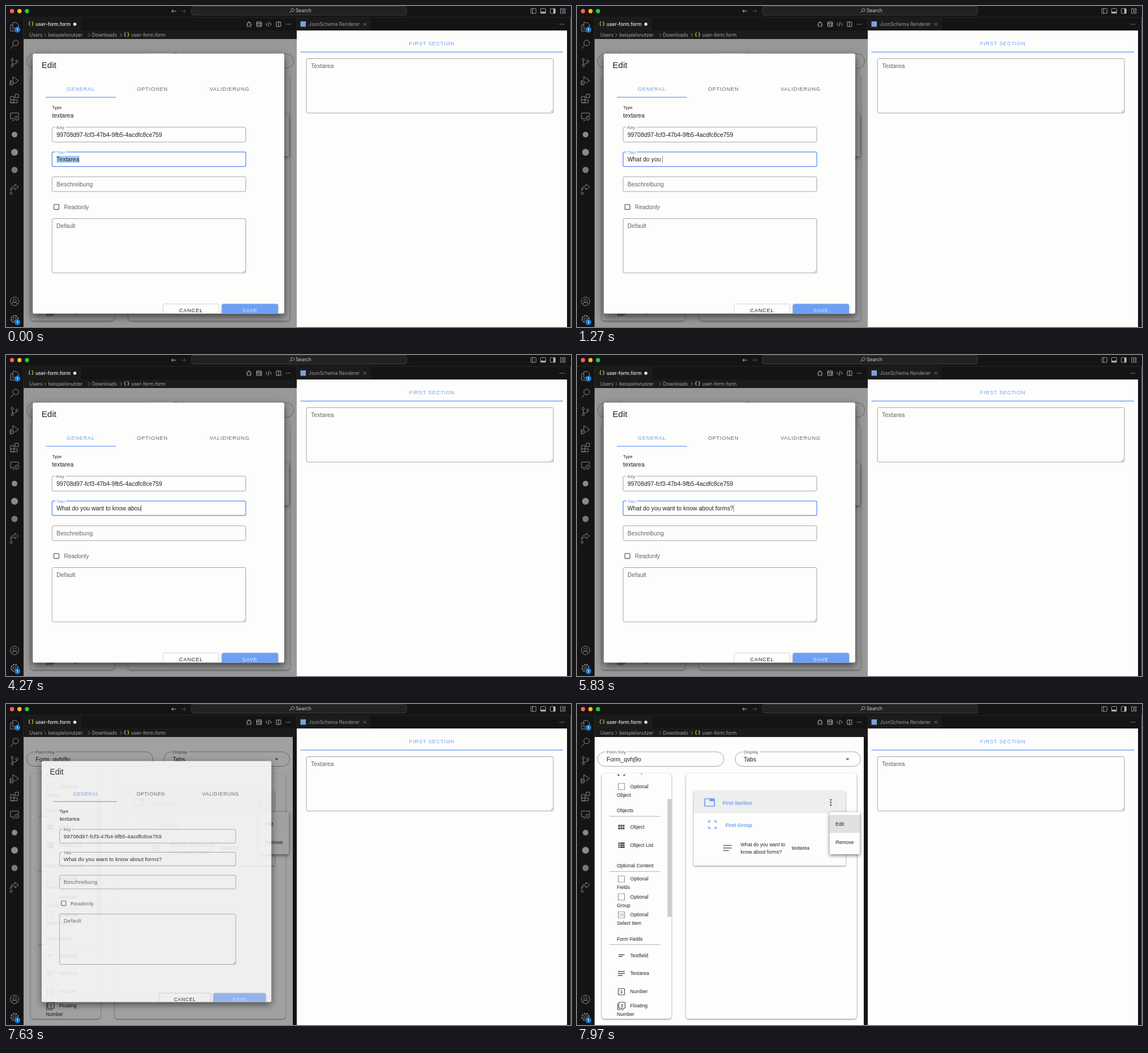
An HTML page for the animation above (8 s loop, 993x564 px).

```html
<!DOCTYPE html>
<html lang="en">
<head>
<meta charset="utf-8">
<title>Form editor</title>
<style>
  html, body { margin: 0; width: 100%; height: 100%; overflow: hidden; background: #141414; }
  svg { display: block; width: 993px; height: 564px; }
  text { font-family: "Liberation Sans", Arial, sans-serif; white-space: pre; }
  .ui { font-family: Inter, sans-serif; }
  .caps { letter-spacing: .82px; text-anchor: middle; }
  .bold { font-weight: bold; }
  .medium { font-weight: 500; }
  .mid { text-anchor: middle; }
  .paper { filter: drop-shadow(0 1px 1.5px #0007); }
  .menu { filter: drop-shadow(0 2px 3px #0008); }
  .dialog { filter: drop-shadow(0 5px 7px #0009); }
</style>
</head>
<body>
<svg id="stage" viewBox="0 0 993 564"></svg>
<script>
const LOOP = 8000;
const BLUE = '#6d9ff6', INK = '#222', MUTED = '#666', LINE = '#8f8f8f', PAPER = '#fdfdfc';
const BODY = 10.45, SMALL = 7.84, ITEM = 8.6, CAPS = 9.14;
const TITLE = 'What do you want to know about forms?';

// Typed characters over time: [ms, count]
const TYPING = [[100, 0], [1250, 12], [1400, 12], [2700, 20], [2930, 21], [4530, 31],
                [4930, 32], [5230, 34], [5370, 35], [5600, 36], [5830, 37]];
const BLUR_AT = 7500, CLOSE_AT = 7580, CLOSE_MS = 163, FADE_MS = 300, BACKDROP = .4;

// Text is placed by its left (or middle) x and the vertical centre of its capitals.
const text = (x, y, s, size = ITEM, fill = INK, cls = '') =>
  `<text x="${x}" y="${y + size * .355}" font-size="${size}" fill="${fill}" class="${cls}">${s}</text>`;
const ui = (x, y, s, fill = '#ccc', cls = '') => text(x, y, s, 8.4, fill, 'ui ' + cls);
const rect = (x, y, x2, y2, fill, rx = 0, more = '') =>
  `<rect x="${x}" y="${y}" width="${x2 - x}" height="${y2 - y}" fill="${fill}" rx="${rx}" ${more}/>`;
const box = (x, y, x2, y2, stroke = LINE, rx = 2.5, width = .8) =>
  rect(x, y, x2, y2, 'none', rx, `stroke="${stroke}" stroke-width="${width}"`);
const path = (d, stroke = '#8a8a8a', width = 1, more = '') =>
  `<path d="${d}" fill="none" stroke="${stroke}" stroke-width="${width}" ${more}/>`;
const dot = (x, y, r, fill) => `<circle cx="${x}" cy="${y}" r="${r}" fill="${fill}"/>`;
const at = (x, y, s) => `<g transform="translate(${x} ${y})">${s}</g>`;
const grip = (x, y) => path(`M${x - 5} ${y - 1}l4-4M${x - 2.5} ${y - 1}l1.5-1.5`, '#777', .7);
const label = (x, y, s, width, fill = MUTED) =>
  rect(x - 2, y - 3, x + width + 2, y + 3, PAPER) + text(x, y, s, SMALL, fill);
const dots = (x, y, fill) => [-3.2, 0, 3.2].map(d => dot(x + d, y, .8, fill)).join('');

function activityBar() {
  const badge = y => dot(20, y, 5.2, '#1177d1') + text(20, y, '1', 6.5, '#fff', 'ui mid bold');
  return [
    at(15, 36, path('M-3-7h6l4 4v7h-10zM-3-3h-4v11h9v-4')), badge(41.5),
    at(15, 67, path('M-7 8L-2 2') + '<circle cx="2" cy="-2" r="5" fill="none" stroke="#8a8a8a"/>'),
    at(15, 99, path('M-4-3V4M4 0q0 3-8 3M-4-7a2 2 0 1 0 .1 0M4-4a2 2 0 1 0 .1 0M-4 4a2 2 0 1 0 .1 0')),
    at(15, 131, path('M-3-1V-7L7 0L0 5M-5 0a3 3 0 0 1 3 3v2a3 3 0 0 1-6 0v-2a3 3 0 0 1 3-3M-8 4h6M-8 0l2 2M-8 8l2-2')),
    at(15, 163, path('M-7-4h6v11h-6zM-7 2h12v5h-12M1-8h6v6h-6z')),
    at(15, 194, path('M-1 4h-6v-10h14v5M-4 7h4') + '<circle cx="4" cy="3" r="3.5" fill="none" stroke="#8a8a8a"/>' + path('M3 2l2 1-2 1', '#8a8a8a', .7)),
    dot(15, 226, 5, '#8a8a8a'), dot(15, 257, 6, '#8a8a8a'), dot(15, 288, 5.5, '#777'),
    at(15, 320, path('M1-7l6 5-6 5v-3q-6-1-8 5q0-9 8-9zM-6 7a2 2 0 1 0 .1 0')),
    at(15, 519, path('M0-7.5a7.5 7.5 0 1 0 .1 0M0-4a3 3 0 1 0 .1 0M-5 5q1-4 5-4t5 4')),
    at(15, 550, path('M0-6a6 6 0 1 0 .1 0', '#8a8a8a', 2.2, 'stroke-dasharray="3 1.7"') + path('M0-2.5a2.5 2.5 0 1 0 .1 0')),
    badge(555.5)
  ].join('');
}

function titleBar() {
  const lights = ['#ff5f57', '#febc2e', '#28c840'].map((c, i) => dot(10.5 + i * 13.2, 9, 3.7, c)).join('');
  const pane = (x, bar) => box(x - 4.5, 4.5, x + 4.5, 13, '#bbb', 1) + rect(...bar, '#bbb');
  return lights +
    path('M299 9h-8m3-3l-3 3 3 3', '#bbb') + path('M308 9h8m-3-3l3 3-3 3', '#555') +
    rect(326, .5, 704, 16, '#222', 4, 'stroke="#444" stroke-width=".8"') +
    path('M498 12l3-3M503.5 4.5a2.7 2.7 0 1 0 .1 0', '#bbb', .9) + ui(509, 8.5, 'Search') +
    pane(927, [925, 5, 925.8, 13]) + pane(944, [940, 10, 948, 12.5]) + pane(961, [962, 5, 965, 13]) +
    box(974.5, 4.5, 978, 13, '#bbb', .5) + box(980, 4.5, 983, 8, '#bbb', .5) + box(980, 10, 983, 13, '#bbb', .5);
}

function tabs() {
  const chevron = x => path(`M${x - 1.5} 48l3 3-3 3`, '#999', .8);
  const braces = (x, y) => text(x, y, '{ }', 8.4, '#d5c33e', 'ui bold');
  return path('M30.5 20V564M0 20H993M511 20V43M131 20V43M640 20V43', '#2b2b2b', .8) +
    rect(31, 20.5, 131, 58, '#1b1b1b') + rect(131, 43, 511, 58, '#1b1b1b') + rect(511.5, 20.5, 640, 43, '#1b1b1b') +
    braces(39, 31.5) + ui(52, 32, 'user-form.form', '#f2f2f2', 'medium') + dot(121, 32, 2.7, '#eee') +
    ui(41, 51, 'Users', '#a5a5a5') + chevron(69) + ui(74.5, 51, 'beispielsnutzer', '#a5a5a5') + chevron(146) +
    ui(151, 51, 'Downloads', '#a5a5a5') + chevron(202) + braces(207, 50.5) + ui(220, 51, 'user-form.form', '#a5a5a5') +
    at(427, 32, path('M0-3a3 3.5 0 1 0 .1 0M-4-3l2 2M4-3l-2 2M-5 1h2M5 1h-2M-4 5l2-2M4 5l-2-2M-2-3q2-3 4 0', '#bbb', .9)) +
    box(440.5, 28, 449, 36, '#bbb', .5, 1) + path('M441 30.5h8M442 33h3M447 32v3', '#bbb', 1.2) +
    path('M459 29.5l-2.5 2.5 2.5 2.5M464 29.5l2.5 2.5-2.5 2.5M462.5 28l-2 8', '#bbb', .9) +
    box(475, 28, 483, 36, '#bbb', .5, .9) + path('M479 28v8', '#bbb', .9) + dots(496, 32, '#bbb') +
    rect(517.5, 27, 527, 36.5, '#7ba3d8') + ui(532, 32, 'JsonSchema Renderer', '#9a9a9a') +
    path('M628 29.5l5 5m0-5l-5 5', '#999', .8) + dots(977, 32, '#bbb');
}

const renderer = () => rect(511, 43, 986, 564, PAPER) + rect(992, 20, 993, 564, '#666') +
  text(748.5, 66, 'FIRST SECTION', CAPS, BLUE, 'caps') + rect(517.5, 80.2, 979, 81.6, BLUE) +
  box(528, 92.5, 962, 188) + text(536, 105, 'Textarea', BODY, MUTED) + grip(962, 188);

const corners = (x, y, color, r = 6.5) => path(
  `M${x - r} ${y - 3}v${3 - r}h${r - 3}M${x + 3} ${y - r}h${r - 3}v${r - 3}M${x + r} ${y + 3}v${r - 3}h${3 - r}M${x - 3} ${y + r}h${3 - r}v${3 - r}`, color, 1.6);
const icons = {
  dashed: y => path(`M72.5 ${y - 5}h11v11h-11z`, '#444', 1.2, 'stroke-dasharray="1.4 1.35"'),
  select: y => icons.dashed(y) + path(`M75 ${y - 1}h7M75 ${y + 2}h7`, '#444', 1.2, 'stroke-dasharray="1.4 1.35"'),
  grid: y => path(`M72.5 ${y - 2}h11M72.5 ${y + 2.5}h11`, '#555', 3.6, 'stroke-dasharray="3.2 .7"'),
  list: y => [-2.8, .7, 4.2].map(d => path(`M72.5 ${y + d}h2.4m.8 0h8`, '#555', 2.7)).join(''),
  short: y => path(`M73 ${y - 1}h10.5M73 ${y + 2}h7`, '#555', 1.3),
  lines: y => path(`M72 ${y - 3}h12M72 ${y + .5}h12M72 ${y + 4}h8`, '#555', 1.3),
  one: y => box(72.5, y - 5, 83.5, y + 6, '#444', 1, 1.1) + text(78, y + .5, '1', 7.5, '#333', 'mid bold'),
  stack: y => box(73.5, y - 6, 84.5, y + 4.5, '#444', 1, 1.1) + path(`M71.5 ${y - 4}v11h11`, '#444', 1.1) + text(79, y - .7, '1', 7.5, '#333', 'mid bold')
};

function palette(wide) {
  const heading = (y, s) => text(70, y, s) + rect(57, y + 9.8, 146, y + 10.7, '#aaa');
  const item = (y, icon, s, rest) => icons[icon](y) + text(93.5, y, s) + (rest ? text(70, y + 15, rest) : '');
  const last = wide ? item(537, 'stack', 'Floating Number') : item(530, 'stack', 'Floating', 'Number');
  return rect(43.5, 122, wide ? 190 : 166, 553, PAPER, 5, 'class="paper"') +
    `<g clip-path="url(#palette)">` +
    corners(78, 120, '#555', 5.5) + text(93.5, 119, 'Group') + item(144.5, 'dashed', 'Optional', 'Object') +
    heading(187, 'Objects') + item(216, 'grid', 'Object') + item(247.5, 'list', 'Object List') +
    heading(284, 'Optional Content') + item(307, 'dashed', 'Optional', 'Fields') +
    item(338.5, 'dashed', 'Optional', 'Group') + item(370, 'select', 'Optional', 'Select Item') +
    heading(412.5, 'Form Fields') + item(441.5, 'short', 'Textfield') + item(473, 'lines', 'Textarea') +
    item(505, 'one', 'Number') + last + '</g>' +
    (wide ? '' : rect(159, 167, 166, 374, '#cdcdcd'));
}

function page(wide) {
  const right = wide ? 511 : 504, shift = wide ? 3 : 0;
  return rect(31, 58, right, 564, PAPER) +
    box(36.5, 84, 258 + shift, 109.5, LINE, 12.7) + label(52, 84, 'Form Key', 34) + text(52, 97, 'Form_qvhj9o', BODY) +
    box(278 + shift, 84, right - 5.5, 109.5, LINE, 12.7) + label(293 + shift, 84, 'Display', 27) +
    text(293 + shift, 97, 'Tabs', BODY) + '<path d="M472 95.5h7l-3.5 3.5z" fill="#666"/>' +
    palette(wide) +
    rect(wide ? 215 : 191.5, 122, wide ? 498.5 : 491.5, 553, PAPER, 5, 'class="paper"') +
    rect(205, 153, 472, 284, PAPER, 2, 'class="paper"') + rect(205, 153, 472, 192, '#eee', 2) +
    box(224.5, 166.5, 241.5, 179.5, BLUE, 1, 1.7) + rect(233, 166, 242, 171, BLUE) +
    text(256, 173.5, 'First Section', ITEM, BLUE, 'bold') +
    [168.5, 173, 177.5].map(y => dot(446, y, 1.4, '#555')).join('') +
    corners(238, 212, BLUE) + text(261, 213, 'First Group', ITEM, BLUE, 'bold') +
    path('M257 248.5h15M257 253h15M257 257.5h10', '#666', 1.5) +
    text(287.5, 246.5, 'What do you want to') + text(287.5, 259.5, 'know about forms?') + text(377.5, 253, 'textarea') +
    rect(444, 190, 497, 264, PAPER, 2, 'class="menu"') +
    (wide ? '' : rect(444, 195, 497, 226.5, '#e0e0e0', 0, 'id="highlight"')) +
    text(454.5, 211, 'Edit') + text(454.5, 242.5, 'Remove');
}

// The inset narrows the layout on both sides; text keeps its size.
function dialog(inset) {
  const left = 81 + inset, right = 421.5 - inset, inner = 88.7 + inset;
  const caps = (x, y, s, fill) => text(x, y, s, CAPS, fill, 'caps');
  return rect(47 + inset, 83.5, 489 - inset, 540.5, PAPER, 3, 'class="dialog"') +
    text(62.5 + inset, 104, 'Edit', 15.1) +
    caps(131.5 + inset, 145.5, 'GENERAL', BLUE) + caps(257.3, 145.5, 'OPTIONEN', MUTED) +
    caps(393 - inset, 145.5, 'VALIDIERUNG', MUTED) + rect(70 + inset, 159.7, 193, 161, BLUE) +
    text(left, 178.5, 'Type', SMALL) + text(left, 192.5, 'textarea', BODY) +
    box(left, 213, right, 239) + label(inner, 213.5, 'Key', 14) +
    text(inner, 226, '99708d97-fcf3-47b4-9fb5-4acdfc8ce759', BODY) +
    `<g id="idle">${box(left, 256.5, right, 282)}${label(inner, 257, 'Titel', 15)}</g>` +
    `<g id="focus">${box(left, 256.5, right, 282, BLUE, 2.5, 1.5)}${label(inner, 257, 'Titel', 15, BLUE)}</g>` +
    rect(inner, 263, inner + 40.3, 275.5, '#aecdfa', 0, 'id="selection"') +
    `<g id="value">${text(inner, 269.5, '', BODY)}</g>` +
    rect(0, 263.5, .8, 275.5, '#777', 0, 'id="caret"') +
    box(left, 300, right, 326) + text(inner, 313, 'Beschreibung', BODY, MUTED) +
    box(left + 3.2, 348.7, left + 12, 357.5, '#666', 1, 1.3) + text(left + 20.7, 353.5, 'Readonly', BODY, MUTED) +
    box(left, 373.5, right, 469) + text(inner, 386.5, 'Default', BODY, MUTED) + grip(right, 469) +
    '<g clip-path="url(#dialog)">' +
    box(276 - inset, 523.5, 374 - inset, 548, '#c8c8c8', 2.5) + caps(325.3 - inset, 535, 'CANCEL', INK) +
    rect(379.5 - inset, 523.5, 478 - inset, 548, BLUE, 2.5, 'class="paper"') +
    rect(379.5 - inset, 523.5, 478 - inset, 548, '#fff', 2.5, 'id="press" opacity=".25"') +
    caps(428.8 - inset, 535, 'SAVE', '#e3edff') + '</g>';
}

document.getElementById('stage').innerHTML = `
  <defs>
    <clipPath id="palette">${rect(43, 122, 190, 553, '#000')}</clipPath>
    <clipPath id="dialog">${rect(47, 83, 489, 540.5, '#000')}</clipPath>
  </defs>
  ${rect(0, 0, 993, 564, '#141414')}${titleBar()}${tabs()}${activityBar()}
  <g id="wide">${page(true)}</g><g id="narrow">${page(false)}</g>
  <rect id="backdrop" x="31" y="58" height="506"/>
  <g id="modal"></g>${renderer()}`;

const el = id => document.getElementById(id);
const set = (id, name, value) => el(id).setAttribute(name, value);
const show = (id, on) => set(id, 'display', on ? 'inline' : 'none');
const clamp = x => Math.max(0, Math.min(1, x));

// cubic-bezier(x1, 0, x2, 1)
function ease(x, x1, x2) {
  let lo = 0, hi = 1;
  for (let i = 0; i < 24; i++) {
    const t = (lo + hi) / 2, u = 1 - t;
    if (3 * u * u * t * x1 + 3 * u * t * t * x2 + t * t * t < x) lo = t; else hi = t;
  }
  return lo * lo * (3 - 2 * lo);
}

function typedCount(t) {
  const i = TYPING.findIndex(([time]) => time > t);
  if (i === 0) return 0;
  if (i < 0) return TITLE.length;
  const [t0, n0] = TYPING[i - 1], [t1, n1] = TYPING[i];
  return Math.floor(n0 + (n1 - n0) * (t - t0) / (t1 - t0));
}

let laidOutClosing;
function layOut(closing) {
  if (closing === laidOutClosing) return;
  laidOutClosing = closing;
  el('modal').innerHTML = dialog(closing ? 3.2 : 0);
  show('wide', !closing);
  show('narrow', closing);
  set('backdrop', 'width', closing ? 473 : 480);
}

function draw(t) {
  const count = typedCount(t), focused = t < BLUR_AT, closing = t >= CLOSE_AT;
  layOut(closing);

  const value = el('value').firstChild;
  value.textContent = count ? TITLE.slice(0, count) : 'Textarea';
  show('selection', !count);
  show('focus', focused);
  show('idle', !focused);
  show('press', !focused);
  const idleTime = t - TYPING[TYPING.length - 1][0];
  show('caret', count && focused && (idleTime < 0 || idleTime % 1000 < 500));
  set('caret', 'x', 88.7 + value.getComputedTextLength());

  const leave = ease(clamp((t - CLOSE_AT) / CLOSE_MS), .4, 1);
  const fade = ease(clamp((t - CLOSE_AT) / FADE_MS), .4, .2);
  set('backdrop', 'opacity', BACKDROP * (1 - fade));
  set('highlight', 'opacity', fade);
  show('modal', leave < .999);
  set('modal', 'opacity', 1 - leave);
  set('modal', 'transform',
    `translate(${closing ? 264.5 : 268} 312) scale(${1 - leave / 2}) translate(-268 -312)`);
}

const start = performance.now();
function tick() {
  draw((performance.now() - start) % LOOP);
  requestAnimationFrame(tick);
}
tick();
</script>
</body>
</html>
```
